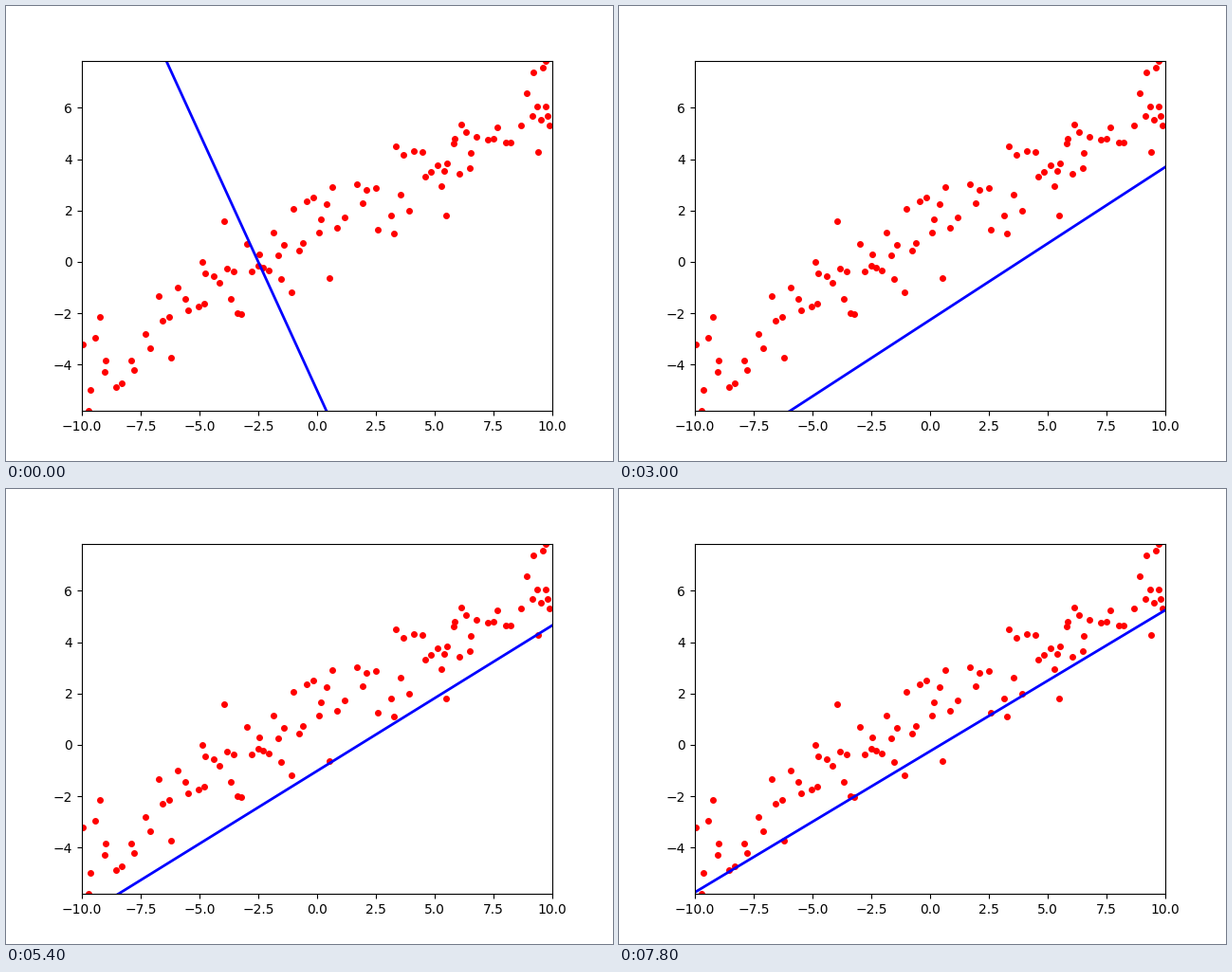
A matplotlib script that plays this animation: 640 px wide and 480 px high, repeating every 8000 ms.

```python
import numpy as np
import matplotlib.pyplot as plt
from matplotlib.animation import FuncAnimation

STEPS, INTERVAL = 40, 200
RATE = 0.02
X_LIM, Y_LIM = (-10, 10), (-5.798, 7.832)

# Averages of x, y, x*x and x*y that drive the fit
MX, MY, MXX, MXY = 0.736, 1.38, 33.28, 18.06

# Outlying samples that give the cloud its outline
OUTLINE = [(-9.96, -3.21), (-9.72, -5.79), (-9.23, -2.14), (-6.21, -3.72),
           (-4.88, 0.0), (-3.95, 1.59), (-3.39, -1.99), (0.52, -0.63),
           (3.35, 4.5), (5.48, 1.81), (6.13, 5.35), (9.72, 7.82)]
# Ten-percent steps of the spread along x
DECILES = [-9.9, -7.3, -4.88, -2.78, -1.25, 0.52, 3.1, 5.08, 6.57, 9.11, 9.92]


def make_cloud(n, seed=4):
    """Noisy samples around the best-fit line, plus the outline."""
    rng = np.random.default_rng(seed)
    rank = (np.arange(n) + rng.random(n)) / n * 10
    x = np.interp(rank, np.arange(11), DECILES)
    slope = (MXY - MX * MY) / (MXX - MX * MX)
    noise = np.clip(rng.normal(0, 0.95, n), -1.6, 1.6)
    y = MY + slope * (x - MX) + noise
    return np.vstack([np.column_stack([x, y]), OUTLINE]).T


def descend(slope, bias):
    """Gradient descent on the mean squared error, one entry per step."""
    path = []
    for _ in range(STEPS):
        path.append((slope, bias))
        d_slope = MXY - slope * MXX - bias * MX
        d_bias = MY - slope * MX - bias
        slope += 2 * RATE * d_slope
        bias += 2 * RATE * d_bias
    return path


path = descend(slope=-2, bias=-5)

fig, ax = plt.subplots(figsize=(6.4, 4.8), dpi=100)
ax.set(xlim=X_LIM, ylim=Y_LIM)
ax.plot(*make_cloud(100 - len(OUTLINE)), "ro", markersize=4)
ends = np.array(X_LIM)
line, = ax.plot([], [], "b", linewidth=2)


def draw(i):
    slope, bias = path[i]
    line.set_data(ends, slope * ends + bias)
    return line,


anim = FuncAnimation(fig, draw, frames=STEPS, interval=INTERVAL,
                     repeat=True, repeat_delay=0)
plt.show()
```
